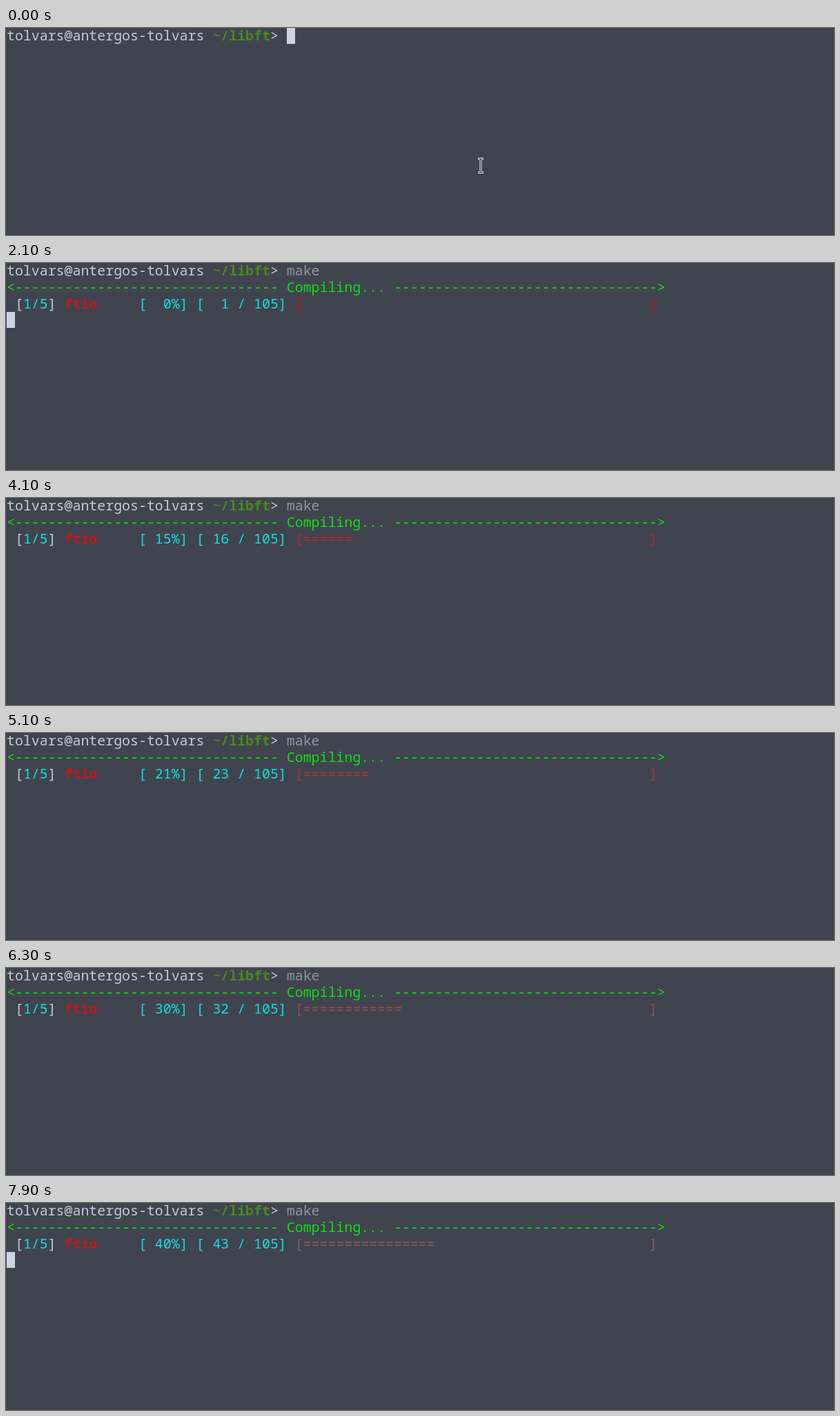
These frames come from a looping animation (1200x300 px, 8 s). An HTML page:

```html
<!DOCTYPE html>
<html lang="en">
<head>
<meta charset="utf-8">
<title>Compiling</title>
<style>
  html, body { margin: 0; width: 100%; height: 100%; overflow: hidden; background: #40444f; }
  pre {
    position: absolute; left: 1px; top: -1px; margin: 0;
    font: 19.9px/23.75px "Noto Sans Mono", monospace;
    font-variant-ligatures: none;
    color: #c6cbd4;
  }
  b.path { color: #4a881e; }
  b.name { color: #c5161a; }
  .command { color: #9792a2; }
  .title { color: #10e112; }
  .count { color: #12dfe2; }
  #caret { position: absolute; width: 12px; height: 23.5px; background: #d0d4e2; }
  #pointer { position: absolute; left: 680px; top: 186px; }
</style>
</head>
<body>
<pre id="screen"></pre>
<div id="caret"></div>
<svg id="pointer" width="16" height="28" fill="none">
  <path id="beam" d="M4 3.5H7L8 4.5L9 3.5H12M8 4.5V22.5M4 23.5H7L8 22.5L9 23.5H12" stroke="#e4e6ec" stroke-width="3.2"/>
  <path d="M4.5 3.5H7L8 4.5L9 3.5H11.5M8 4.5V22.5M4.5 23.5H7L8 22.5L9 23.5H11.5" stroke="#30333d" stroke-width="1.2"/>
</svg>
<script>
const LOOP = 8000, CELL = 11.94, ROW = 23.75, PROMPT_CELLS = 34;
const KEY_TIMES = [100, 200, 400, 500];
const ENTER = 600, TITLE = 1800, PROGRESS = 1900;
const TOTAL = 105, BAR_CELLS = 42;

const screen = document.getElementById('screen');
const caret = document.getElementById('caret');
const pointer = document.getElementById('pointer');

const span = (name, text) => `<span class="${name}">${text}</span>`;
const dashes = '-'.repeat(32);
const prompt = 'tolvars@antergos-tolvars <b class="path">~/libft</b>&gt; ';
const title = span('title', `&lt;${dashes} Compiling... ${dashes}&gt;`);

function progressLine(time) {
  const done = Math.max(1, Math.floor(7.7 + 0.0072 * (time - 2900)));
  const percent = Math.floor(done * 100 / TOTAL);
  const bar = '='.repeat(2 * Math.floor(percent / 5)).padEnd(BAR_CELLS);
  // The bar fades from red towards grey as it fills.
  const mix = (from, to) => Math.round(from + (to - from) * percent / 40);
  const color = `rgb(${mix(206, 140)},${mix(10, 92)},${mix(14, 96)})`;
  const count = `[${String(percent).padStart(3)}%] [${String(done).padStart(3)} / ${TOTAL}]`;
  return ` [${span('count', '1/5')}] <b class="name">ftio</b>     ${span('count', count)} ` +
    `<span style="color:${color}">[${bar}]</span>`;
}

function caretVisible(time) {
  if (time < 1100) return true;
  return time >= TITLE && Math.floor(time / 600) % 2 === 1;
}

function draw(now) {
  const time = Math.floor(now % LOOP / 100) * 100;
  const typed = KEY_TIMES.filter(key => time >= key).length;
  const lines = [prompt + span('command', 'make'.slice(0, typed))];
  if (time >= TITLE) lines.push(title);
  if (time >= PROGRESS) lines.push(progressLine(time));
  screen.innerHTML = lines.join('\n');

  const entered = time >= ENTER;
  const column = entered ? 0 : PROMPT_CELLS + typed;
  const row = entered ? lines.length : 0;
  caret.style.left = 1 + column * CELL + 'px';
  caret.style.top = row * ROW - 0.5 + 'px';
  caret.style.visibility = caretVisible(time) ? 'visible' : 'hidden';
  pointer.style.visibility = typed ? 'hidden' : 'visible';
}

const start = performance.now();
function tick() {
  draw(performance.now() - start);
  requestAnimationFrame(tick);
}
tick();
</script>
</body>
</html>
```
